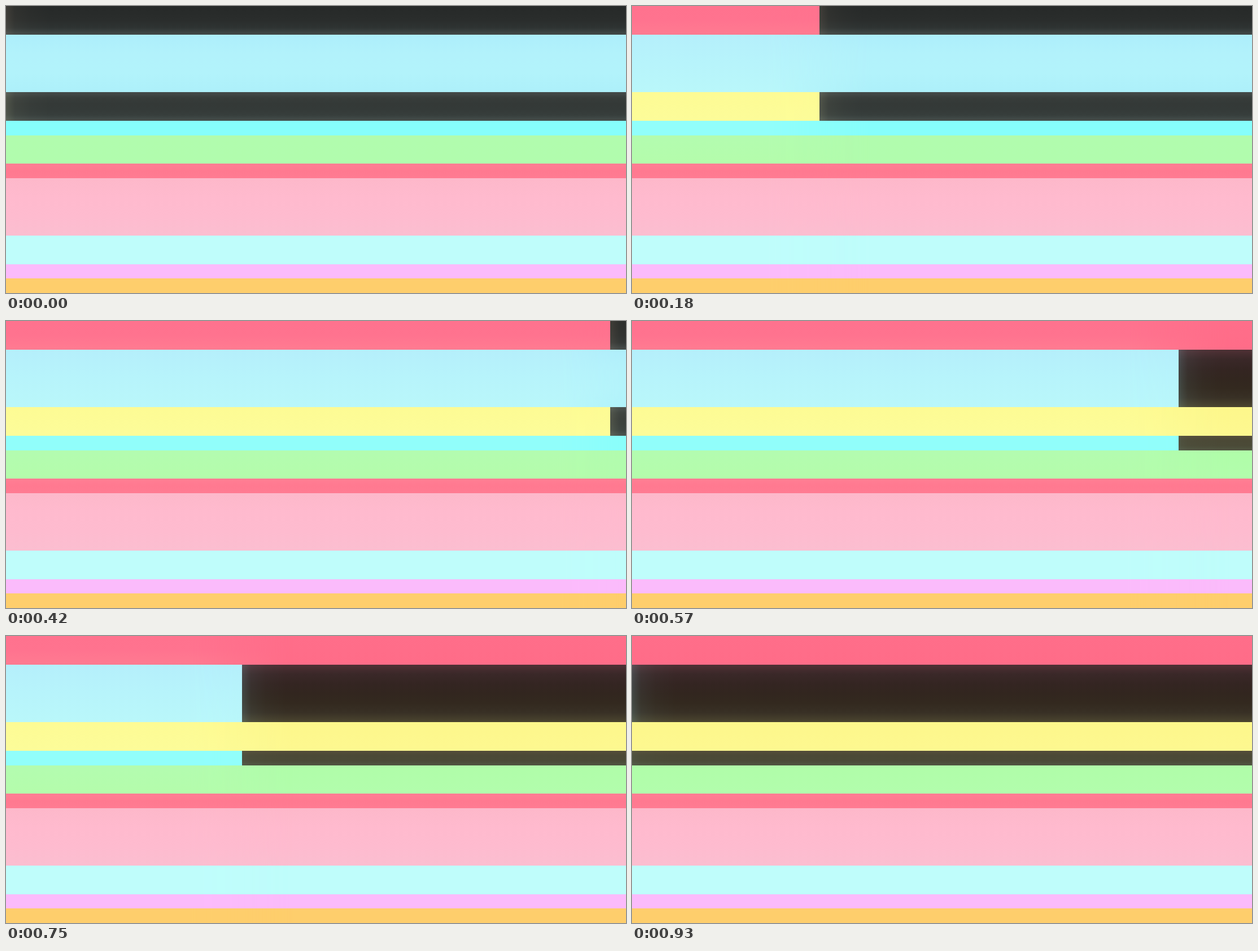
An HTML page that plays this animation: 1098x510 px, repeating every 1060 ms.

```html
<!DOCTYPE html>
<html lang="en">
<head>
<meta charset="utf-8">
<title>Colour bands</title>
<style>
  html, body { margin: 0; width: 100%; height: 100%; overflow: hidden; background: #000; }
  #stage { position: relative; width: 1098px; height: 510px; overflow: hidden; }
  #stage div { position: absolute; left: 0; top: 0; right: 0; bottom: 0; }
</style>
</head>
<body>
<div id="stage"></div>
<script>
const LOOP = 1060, STEP = 30, TURN = 480;
const edges = [0, 51, 153, 204, 230, 280, 306, 408, 459, 484, 510];

// Shade of each band, top to bottom; shades spread evenly over the band.
const lower = ['#ff7e94 #ff7990 #ff7b92', '#fdb8ca #ffbace #febbcf #fbbed0',
  '#bffdfb', '#fbbbfb', '#fece6c'];
const lit = ['#ff728e #ff738f #ff7b91', '#b5effb #b7f4fb #b9f7fa',
  '#fdfb94 #fcfc99', '#91fefb', '#b3fcb0 #b4fcab', ...lower];
const beforeTurn = ['#ff728e #ff738f #ff7b91', '#adeefb #b2f2fb #b2f3fb #adf0fa',
  '#fdfb94 #fcfc99', '#86fefb', '#b1fcae #b1fcad', ...lower];
const afterTurn = ['#ff6e8a #ff6c88', '#b5effb #b7f4fb #b9f7fa',
  '#fdf78b #fdf890', '#91fefb', '#b0fda9 #b2fdac', ...lower];

// Unlit bands: row, shade, glow colour and glow strength at the moving edge.
const fillGaps = [
  [0, '#272a29 #282b2a #2a2d2c #2e3332 #424a49', '200,170,140', .15],
  [2, '#454c4b #373d3b #343937 #343a38 #373e3c #454f4c', '220,220,165', .16]
];
const drainGaps = [
  [1, '#4f3035 #3a2828 #342522 #32261f #33291f #383025 #4b452f', '150,240,255', .17],
  [3, '#544d39 #4b4936 #4b4a37 #505541', '150,220,220', .06]
];

const stage = document.getElementById('stage');

function addLayer(background) {
  const layer = document.createElement('div');
  layer.style.background = background;
  return stage.appendChild(layer);
}

function bands(rows) {
  const stops = rows.flatMap((row, i) => {
    const shades = row.split(' ');
    if (shades.length === 1) shades.push(shades[0]);
    const height = edges[i + 1] - edges[i];
    return shades.map((c, k) => `${c} ${edges[i] + height * k / (shades.length - 1)}px`);
  });
  return `linear-gradient(${stops})`;
}

function addGap([row, shades, glow, strength]) {
  const gap = addLayer(`linear-gradient(90deg, rgba(${glow},${strength}),
    rgba(${glow},${strength * .35}) 16px, rgba(${glow},${strength * .12}) 42px,
    rgba(${glow},0) 78px), linear-gradient(${shades.split(' ')})`);
  gap.style.top = edges[row] + 'px';
  gap.style.bottom = 510 - edges[row + 1] + 'px';
  return gap;
}

const fillBase = addLayer(bands(beforeTurn));
const drainBase = addLayer(bands(afterTurn));
const litLayer = addLayer(bands(lit));
const fillLayers = [fillBase, ...fillGaps.map(addGap)];
const drainLayers = [drainBase, ...drainGaps.map(addGap)];

// Position of the edge between lit and unlit: [time, x].
const path = [[90, 0], [180, 332], [300, 555], [420, 1070], [450, 1098], [480, 1098],
  [510, 1078], [540, 1035], [570, 968], [750, 418], [840, 160], [900, 35], [930, 0]];

function edgeAt(time) {
  if (time <= path[0][0]) return 0;
  const next = path.findIndex(point => point[0] >= time);
  if (next < 0) return 0;
  const [t0, x0] = path[next - 1], [t1, x1] = path[next];
  return Math.round(x0 + (x1 - x0) * (time - t0) / (t1 - t0));
}

function draw(now) {
  const time = Math.floor(now % LOOP / STEP) * STEP;
  const x = edgeAt(time);
  const draining = time >= TURN;
  for (const layer of fillLayers) layer.style.display = draining ? 'none' : '';
  for (const layer of drainLayers) layer.style.display = draining ? '' : 'none';
  for (const gap of [...fillLayers.slice(1), ...drainLayers.slice(1)]) gap.style.left = x + 'px';

  litLayer.style.display = x > 0 ? '' : 'none';
  const fade = x >= 1098 ? 'none'
    : `linear-gradient(90deg, #000 ${x - 90}px, rgba(0,0,0,.5) ${x}px, transparent ${x + 90}px)`;
  litLayer.style.webkitMaskImage = litLayer.style.maskImage = fade;
}

function tick() {
  draw(performance.now());
  requestAnimationFrame(tick);
}
tick();
</script>
</body>
</html>
```
